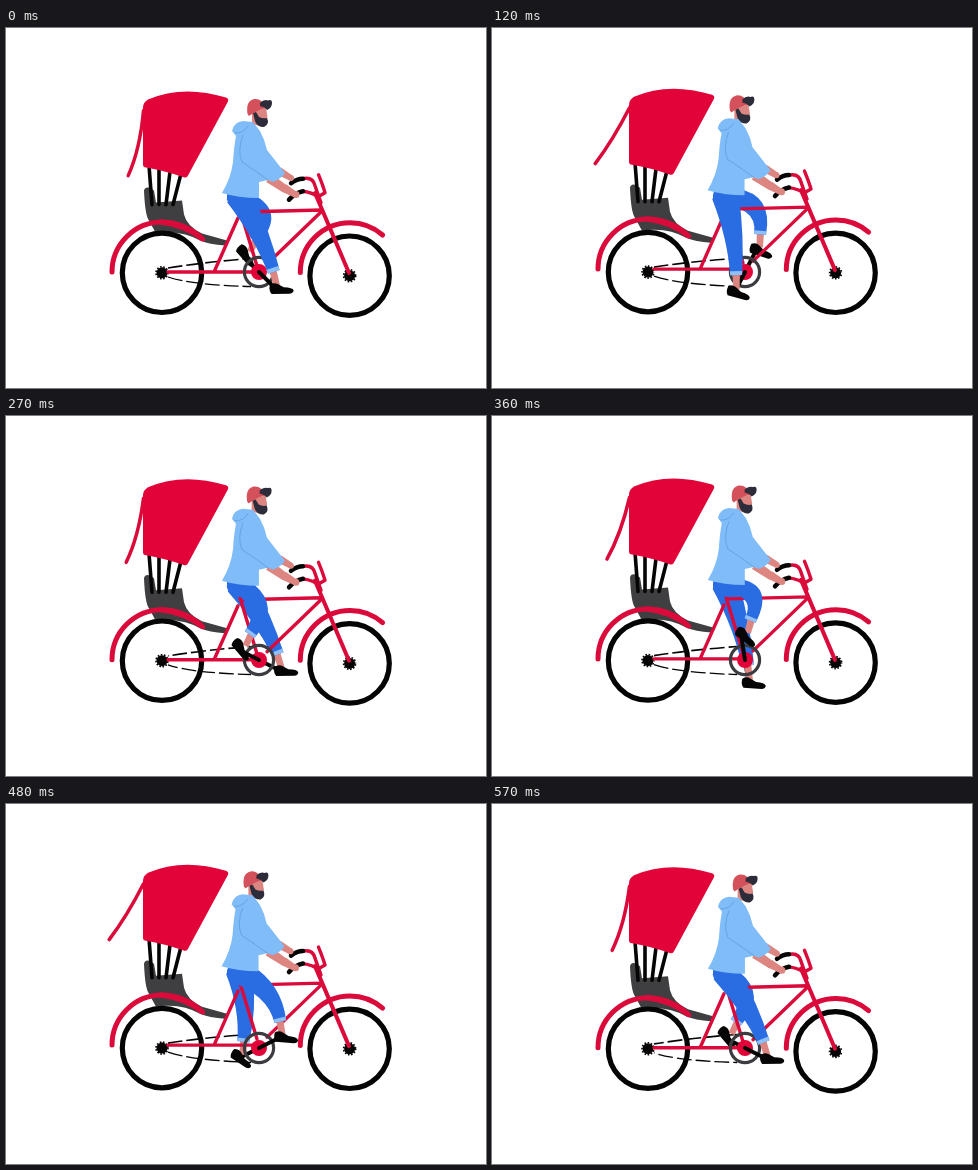
Recreate the animation shown at these times as an HTML page with a canvas. Size 480 px wide and 360 px high, loop 0.6 s.

```html
<!DOCTYPE html>
<html lang="en">
<head>
<meta charset="utf-8">
<title>Cycle rickshaw</title>
<style>
html, body { margin: 0; height: 100%; overflow: hidden; background: #fff; }
canvas { display: block; }
</style>
</head>
<body>
<canvas id="stage" width="480" height="360"></canvas>
<script>
const ctx = document.getElementById('stage').getContext('2d');
const RED = '#e20338', ROD = '#da0a3a', BLACK = '#050505', GREY = '#3f3f41', RING = '#3b3b40',
  DENIM = '#2a6ce2', CUFF = '#8fc0f5', HOODIE = '#80bdf8', FOLD = '#5c9ddd',
  SKIN = '#dd8580', HAT = '#d4505a', BEARD = '#2c2c3a';
const LOOP = 600, STEP = 30, TAU = Math.PI * 2;
const CRANK = [253, 244], HIP = [233, 169], THIGH = 38, SHIN = 40;
const rad = deg => deg * Math.PI / 180;
const mix = (a, b, k) => [a[0] + (b[0] - a[0]) * k, a[1] + (b[1] - a[1]) * k];
const along = (p, dir, k) => [p[0] + dir[0] * k, p[1] + dir[1] * k];

// Unit vector at right angles to a-b, on the forward side of a leg
function normal(a, b) {
  const len = Math.hypot(b[0] - a[0], b[1] - a[1]);
  return [(b[1] - a[1]) / len, (a[0] - b[0]) / len];
}

function fill(color, d) {
  ctx.fillStyle = color;
  ctx.fill(new Path2D(d));
}

function stroke(color, width, d) {
  ctx.strokeStyle = color;
  ctx.lineWidth = width;
  ctx.stroke(new Path2D(d));
}

function disc(color, [x, y], r) {
  ctx.fillStyle = color;
  ctx.beginPath();
  ctx.arc(x, y, r, 0, TAU);
  ctx.fill();
}

function arc(color, width, x, y, r, from = 0, to = TAU) {
  ctx.strokeStyle = color;
  ctx.lineWidth = width;
  ctx.beginPath();
  ctx.arc(x, y, r, from, to);
  ctx.stroke();
}

function shifted(x, y, draw) {
  ctx.save();
  ctx.translate(x, y);
  draw();
  ctx.restore();
}

// Tapered segment between two points with half-widths ra and rb
function taper(color, a, b, ra, rb) {
  const n = normal(a, b);
  fill(color, `M${along(a, n, ra)} L${along(b, n, rb)} L${along(b, n, -rb)} L${along(a, n, -ra)}Z`);
}

function leg(angle) {
  const foot = [258 + 25 * Math.cos(angle), 244.5 + 23.5 * Math.sin(angle)];
  const back = (1 + Math.cos(angle - rad(210))) / 2;
  const tilt = rad(1 + 50 * back ** 1.5);
  const c = Math.cos(tilt), s = Math.sin(tilt);
  const ankle = [foot[0] - 5 * c + 8 * s, foot[1] - 5 * s - 8 * c];

  const d = Math.hypot(ankle[0] - HIP[0], ankle[1] - HIP[1]);
  const k = Math.max(1, d / (THIGH + SHIN)), thigh = THIGH * k, shin = SHIN * k;
  const run = (d * d + thigh * thigh - shin * shin) / (2 * d);
  const out = Math.max(5, Math.sqrt(Math.max(0, thigh * thigh - run * run)));
  const front = normal(HIP, ankle), bend = out / THIGH;
  const knee = along(mix(HIP, ankle, run / d), front, out);
  const hem = mix(knee, ankle, .8), side = normal(knee, hem);

  taper(SKIN, mix(knee, ankle, .6), [ankle[0] + s, ankle[1] + 5], 3.8, 3.2);
  disc(DENIM, HIP, 12);
  fill(DENIM, `M${along(HIP, front, 14)} Q${along(knee, front, 8 + 8 * bend)} ${along(hem, side, 6)}
    L${along(hem, side, -6)} Q${along(knee, front, 4 * bend - 8)} ${along(HIP, front, -13)}Z`);
  taper(CUFF, mix(knee, ankle, .71), hem, 6.2, 6);

  ctx.save();
  ctx.translate(...foot);
  ctx.rotate(tilt);
  fill(BLACK, 'M-12-4 Q-8-7-4-5 L2-2 Q11-2 12 1 Q12 4 8 4.5 L-10 5 Q-13 2-12-4Z');
  ctx.restore();
}

function crankArm(angle) {
  const tip = along(CRANK, [Math.cos(angle), Math.sin(angle)], 21);
  stroke(BLACK, 4, `M${CRANK} L${tip}`);
}

function wheel(x, y) {
  arc(BLACK, 5.2, x, y, 39.7);
  disc(BLACK, [x, y], 5.5);
  ctx.setLineDash([1.6, 1.6]);
  ctx.lineCap = 'butt';
  arc(BLACK, 1.6, x, y, 6);
  ctx.setLineDash([]);
  ctx.lineCap = 'round';
}

function chain(time, lift) {
  const run = time / LOOP * TAU * 15;
  ctx.lineCap = 'butt';
  ctx.setLineDash([14.85, 4]);
  ctx.lineDashOffset = -run;
  stroke(BLACK, 1.6, `M162 ${240 - lift} Q200 ${234 - lift} 245 230.5`);
  ctx.lineDashOffset = run;
  stroke(BLACK, 1.3, `M162 ${249 - lift} Q185 ${257 - lift} 245 258.5`);
  ctx.setLineDash([]);
  ctx.lineCap = 'round';
}

function cabin(sway) {
  stroke(ROD, 3.5, `M137.5 83 Q${127 + 7 * sway} ${118 + 4 * sway} ${111.7 + 10.5 * sway} ${143 + 5 * sway}`);
  fill(GREY, 'M138 163 Q139 159 143 160 L148 163 L150 175 L176 173 L178 187 Q181 199 196 206 L221 213 L219 218 Q203 217 194 213 Q175 202 150 206 L143 193 Q139 188 138 163Z');
  stroke(BLACK, 3.6, 'M143 138 L146 177 M153 141 L153 177 M164 144 L160 177 M175 146 L167 177');
  fill(RED, 'M137 80 Q137 75 142 72 Q177 57 220 70 Q223 71 222 74 L182 148 Q181 151 177 149.5 Q158 143 140 140 Q137 140 137 137Z');
}

function frame() {
  stroke(ROD, 3.4, 'M162 244 H250 M232 190 L208.5 243 M234 182 L251 238 M236 184 L316 182 M316 183 L261 236');
  stroke(ROD, 4, 'M309 165 L343 245');
  arc(ROD, 5, 156, 244, 50, Math.PI, rad(-75));
  fill(ROD, 'M154 191.5 Q182 192 199 210 Q200 215 195 213 Q177 199 154 196.5Z');
  arc(ROD, 5, 344, 244.5, 49.7, Math.PI, rad(-49));
}

function handlebar() {
  stroke(ROD, 3.4, 'M297 151 Q307 149 309 158 L315 175 M297 163.5 Q307 165 312 169 L319 165 Q317 158 312.5 147');
  stroke(BLACK, 4.5, 'M285 155.5 Q291 151 297 151 M283 172 Q289 165 297 163.5');
}

function torso() {
  taper(SKIN, [273, 143], [285, 150], 4, 3);
  disc(SKIN, [285, 150], 3);
  taper(SKIN, [263, 150], [279, 161], 5, 4);
  taper(SKIN, [278, 160], [290, 167], 4.3, 3);
  disc(SKIN, [290, 166.5], 3.5);
  fill(HOODIE, 'M226 103 Q228 94 237 93 L247 94 L254 103 Q259 112 261 122 L279 145 Q275 151 267 154 L262 152 L253 154 L253 170 Q232 170 216 165 Q225 150 227 134 Q228 118 230 108Z');
  stroke(FOLD, .8, 'M229 105 Q237 106 242 98 M237 107 Q231 122 236 134 Q242 138 248 142 M248 142 L262 152');
}

function head() {
  fill(SKIN, 'M246 84 L260 80 L261.5 89 L258 99 L246 96Z');
  fill(BEARD, 'M247 85 L250 84 L253 89 Q257 91 261 90 Q264 96 258 99 Q251 99 249 93Z');
  fill(HAT, 'M241.5 86 Q239.5 73 248 71 Q256 70 260 80 Q251 82 243 88Z');
  fill(BEARD, 'M254 75 Q258 71 262 72.5 Q266 71 266 75 Q266 80 261 82 Q259 79 254 78Z');
}

function draw(time) {
  const sway = Math.cos(time / 300 * TAU), lift = (1 - sway) / 2;
  const near = rad(45) + time / LOOP * TAU, far = near + Math.PI;
  ctx.clearRect(0, 0, 480, 360);
  ctx.lineCap = ctx.lineJoin = 'round';

  shifted(0, -.4 - 3.2 * lift, () => cabin(sway));
  wheel(156, 244.8 - .8 * lift);
  wheel(343.6, 247.7 - 3.2 * lift);
  chain(time, lift);
  crankArm(far);
  leg(far);
  shifted(0, -3.2 * lift, frame);
  arc(RING, 3.2, ...CRANK, 14.6);
  disc(RED, CRANK, 8);
  crankArm(near);
  leg(near);
  shifted(0, -.3 - 4 * lift, handlebar);
  shifted(-4 * lift, -4 * lift, head);
  shifted(-.5 * lift, -3 * lift, torso);
}

function tick() {
  draw(Math.floor(performance.now() % LOOP / STEP) * STEP);
  requestAnimationFrame(tick);
}
tick();
</script>
</body>
</html>
```
